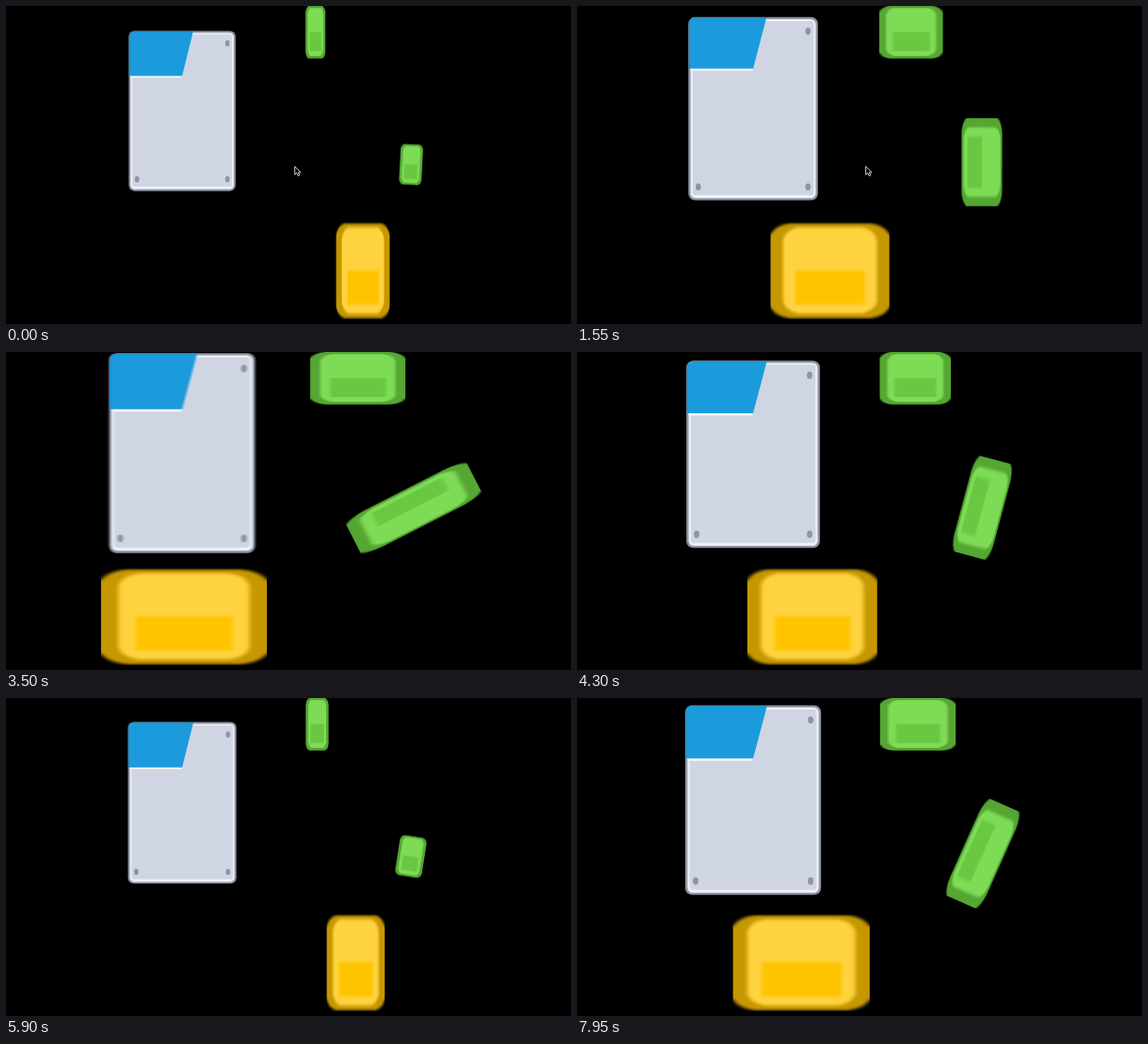
An HTML page for the animation above (8000 ms loop, 600 by 338 pixels).

```html
<!DOCTYPE html>
<html lang="en">
<head>
<meta charset="utf-8">
<title>Stretching blocks</title>
<style>
  html, body { margin: 0; width: 100%; height: 100%; overflow: hidden; background: #000; }
  svg { display: block; width: 100vw; height: 100vh; }
  .green { --edge: #55a633; --body: #7edb56; --core: #6ac742; }
  .gold { --edge: #c69800; --body: #ffd23f; --core: #ffc400; }
</style>
</head>
<body>
<svg viewBox="0 0 600 338" xmlns="http://www.w3.org/2000/svg">
  <defs>
    <filter id="soft"><feGaussianBlur stdDeviation="1.4"/></filter>
    <filter id="fine"><feGaussianBlur stdDeviation=".6"/></filter>
    <clipPath id="view"><rect x="74.5" width="451" height="338"/></clipPath>
    <clipPath id="plate"><rect x=".7" y=".7" width="112.6" height="168.6" rx="5.5"/></clipPath>
    <clipPath id="cell"><rect width="100" height="100"/></clipPath>
    <!-- 100 x 100 block, stretched to any size; its sides are cut hard by the cell -->
    <g id="block" clip-path="url(#cell)">
      <path fill="var(--edge)" filter="url(#soft)"
        d="M-8 12H0Q4 3 16 .8H84Q96 3 100 12H108V88H100Q96 97 84 99.2H16Q4 97 0 88H-8Z"/>
      <path fill="var(--body)" filter="url(#soft)"
        d="M10.5 18Q12 8 23 5H77Q88 8 89.5 18V82Q88 91 77 94H23Q12 91 10.5 82Z"/>
      <rect x="21" y="49.5" width="58.5" height="35.5" fill="var(--core)" filter="url(#soft)"/>
    </g>
  </defs>
  <g clip-path="url(#view)">
    <g id="panel">
      <g filter="url(#fine)">
        <rect x=".3" y=".3" width="113.4" height="169.4" rx="6" fill="#8f94a3"/>
        <rect x="2.2" y="2.2" width="109.6" height="165.6" rx="4.5" fill="#edf0f8"/>
        <rect x="4" y="4" width="106" height="161" rx="2.5" fill="#cfd5e3"/>
        <path d="M2.2 48.9H56.5" stroke="#f3f5fb" stroke-width="2"/>
        <g fill="#8f94a3">
          <ellipse cx="105" cy="13.4" rx="2.3" ry="3.3"/>
          <ellipse cx="105" cy="157.3" rx="2.3" ry="3.3"/>
          <ellipse cx="9" cy="157.3" rx="2.3" ry="3.3"/>
        </g>
      </g>
      <g clip-path="url(#plate)">
        <g filter="url(#fine)">
          <path d="M-3 -3H69.6L57 47.8H-3Z" fill="#1c9bdc"/>
          <path d="M1 47.8V6Q1 1 6 1H68" fill="none" stroke="#1a8fcd" stroke-width="1.4"/>
        </g>
      </g>
    </g>
    <use id="top" href="#block" class="green"/>
    <use id="spin" href="#block" class="green"/>
    <use id="wide" href="#block" class="gold"/>
  </g>
  <path id="pointer" d="M306.7 170.5V179.2L308.8 177.4L310.3 180.6L311.8 179.9L310.4 176.9H313.1Z"
    fill="#000" stroke="#e8e8e8" stroke-width=".9"/>
</svg>
<script>
  const LOOP = 8000, SWING = 3000, TURN = 50, POINTER_END = 2000;
  const el = id => document.getElementById(id);
  const [panel, top_, spin, wide, pointer] = ['panel', 'top', 'spin', 'wide', 'pointer'].map(el);

  const place = (node, left, top, right, bottom, w = 100, h = 100) =>
    node.setAttribute('transform',
      `translate(${left} ${top}) scale(${(right - left) / w} ${(bottom - top) / h})`);

  function draw(t) {
    // p runs 0 → 1 → 0 at constant speed
    const phase = (t - TURN + 2 * SWING) % (2 * SWING);
    const p = 1 - Math.abs(phase / SWING - 1);

    place(panel, 130.5 - 25.2 * p, 26.7 - 30.5 * p, 243.7 + 25 * p, 196.6 + 20.5 * p, 114, 170);
    place(top_, 318 + 6 * p, -0.5, 337.5 + 102 * p, 56.3);
    place(wide, 355.5 - 299.6 * p, 230.2, 410 - 156.5 * p, 332.8);

    const len = 21.5 + 144 * p;
    spin.setAttribute('transform',
      `translate(430.7 167.8) rotate(${180 * p}) translate(${-0.52 * len} -21.1) scale(${len / 100} .438)`);

    pointer.style.display = t < POINTER_END ? '' : 'none';
  }

  const start = performance.now();
  function tick() {
    draw((performance.now() - start) % LOOP);
    requestAnimationFrame(tick);
  }
  draw(0);
  requestAnimationFrame(tick);
</script>
</body>
</html>
```
